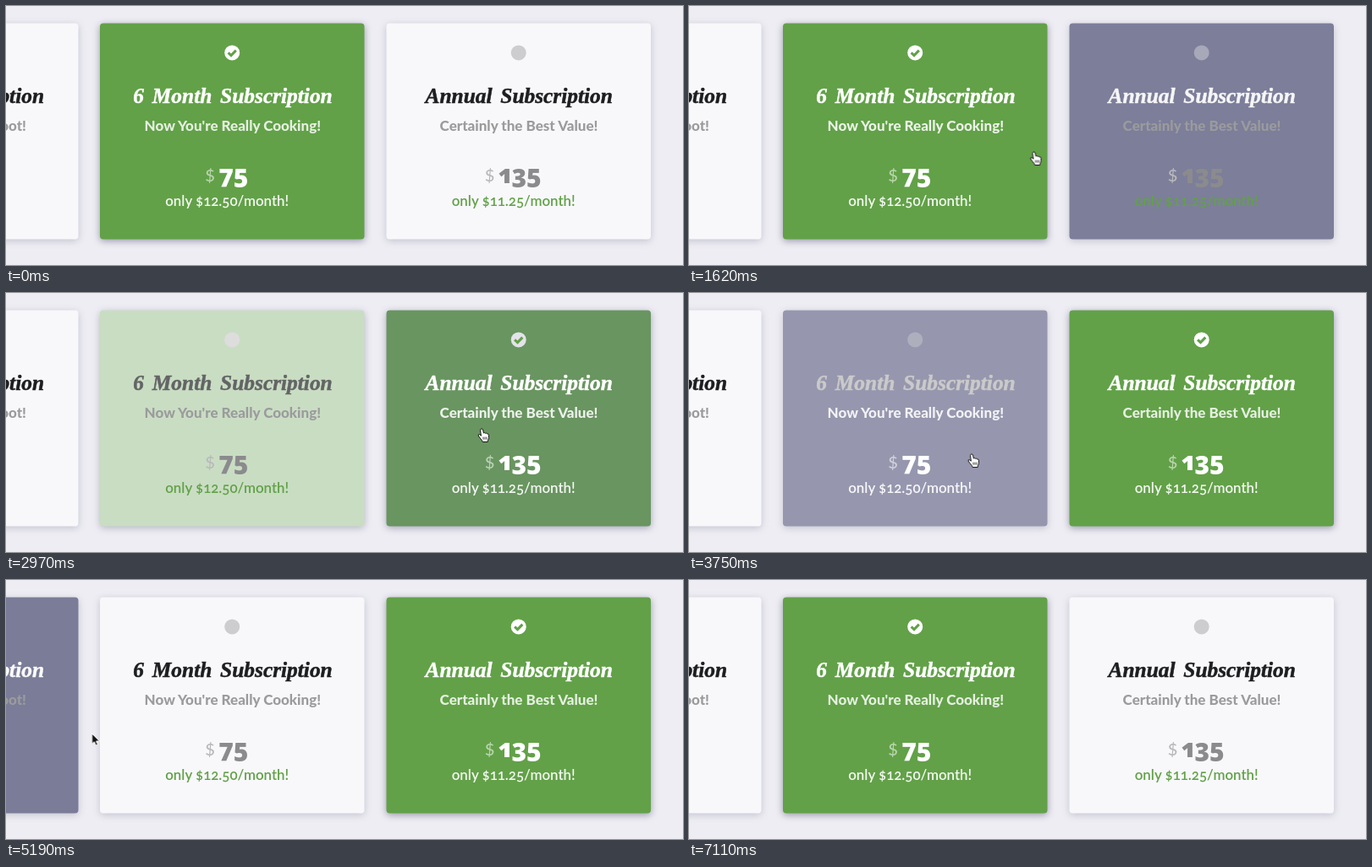
These frames come from a looping animation (800 by 307 pixels, 9110 ms). An HTML page:

```html
<!DOCTYPE html>
<html lang="en">
<head>
<meta charset="utf-8">
<title>Subscription cards</title>
<style>
/* --hover and --sel fade; --over and --pick switch at once */
@property --hover { syntax: "<number>"; inherits: true; initial-value: 0; }
@property --sel { syntax: "<number>"; inherits: true; initial-value: 0; }
@property --over { syntax: "<number>"; inherits: true; initial-value: 0; }
@property --pick { syntax: "<number>"; inherits: true; initial-value: 0; }

html, body { margin: 0; width: 100%; height: 100%; overflow: hidden; background: #eeedf3; }
svg { display: block; }

.card, .cursor {
  animation-duration: 9.11s;
  animation-iteration-count: infinite;
}
.card {
  --green: #62a148;
  --lit: calc(100% * max(var(--hover), var(--sel)));
  --on: calc(100% * max(var(--over), var(--pick)));
  animation-timing-function: ease, step-end, ease, step-end;
}
.left { animation-name: left-hover, left-over; }
.mid { animation-name: mid-hover, mid-over, mid-sel, mid-pick; }
.right { animation-name: right-hover, right-over, right-sel, right-pick; }

.panel {
  fill: color-mix(in srgb, var(--green) calc(100% * var(--sel)),
    color-mix(in srgb, #777996 calc(100% * var(--hover)), #f8f8fb));
  filter: drop-shadow(0 2.5px 4.5px rgb(45 48 85 / calc(.22 + .24 * var(--sel))));
}
.dot {
  fill: color-mix(in srgb, #fff calc(100% * var(--sel)),
    color-mix(in srgb, #a5a6b7 calc(100% * var(--hover)), #cdcdcf));
}
.check {
  fill: none;
  stroke: var(--green);
  stroke-width: 3;
  opacity: var(--pick);
}
text { font-family: Lato, "Open Sans", sans-serif; }
.title {
  font: italic bold 25.4px "Liberation Serif", serif;
  word-spacing: 3.4px;
  text-anchor: middle;
  color: color-mix(in srgb, #fff var(--lit), #1d1e20);
  fill: currentColor;
  stroke: currentColor;
  stroke-width: .5px;
}
.sub {
  font-size: 17px;
  font-weight: 800;
  text-anchor: middle;
  fill: color-mix(in srgb, rgb(255 255 255 / calc(.84 + .04 * var(--over))) var(--on), #9b9b9d);
}
.unit {
  font-size: 20px;
  font-weight: 500;
  fill: color-mix(in srgb, rgb(255 255 255 / .55) var(--on), #b9b9bb);
}
.price {
  font: 800 30px "Open Sans", Lato, sans-serif;
  font-variant-numeric: oldstyle-nums;
  fill: color-mix(in srgb, #fff var(--on), #8b8b8e);
}
.rate {
  font-size: 16.9px;
  font-weight: 600;
  text-anchor: middle;
  font-variant-numeric: oldstyle-nums;
  fill: color-mix(in srgb, rgb(255 255 255 / .92) var(--on), var(--green));
}
.left text { text-anchor: end; }

.cursor {
  animation-name: travel, cursor-over;
  animation-timing-function: linear, step-end;
}
.hand { opacity: var(--over); fill: #fff; stroke: #111; stroke-linejoin: round; }
.arrow { opacity: calc(1 - var(--over)); fill: #111; stroke: #fff; }

@keyframes left-hover {
  0%, 49.62%, 60.15%, 100% { --hover: 0; }
  52.91%, 56.86% { --hover: 1; }
}
@keyframes left-over {
  0%, 56.86%, 100% { --over: 0; }
  49.62% { --over: 1; }
}
@keyframes mid-hover {
  0%, 17.7%, 26.45%, 39.65%, 52.47%, 57.19%, 78.48%, 100% { --hover: 0; }
  20.99%, 23.16%, 42.94%, 49.18%, 60.48%, 75.19% { --hover: 1; }
}
@keyframes mid-over {
  0%, 23.16%, 49.18%, 75.19%, 100% { --over: 0; }
  17.7%, 39.65%, 57.19% { --over: 1; }
}
@keyframes mid-sel {
  0%, 31.28%, 70.03%, 100% { --sel: 1; }
  34.57%, 66.74% { --sel: 0; }
}
@keyframes mid-pick {
  0%, 66.74%, 100% { --pick: 1; }
  31.28% { --pick: 0; }
}
@keyframes right-hover {
  0%, 4.28%, 20.9%, 23.44%, 42.53%, 100% { --hover: 0; }
  7.57%, 17.61%, 26.73%, 39.24% { --hover: 1; }
}
@keyframes right-over {
  0%, 17.61%, 39.24%, 100% { --over: 0; }
  4.28%, 23.44% { --over: 1; }
}
@keyframes right-sel {
  0%, 31.28%, 70.03%, 100% { --sel: 0; }
  34.57%, 66.74% { --sel: 1; }
}
@keyframes right-pick {
  0%, 66.74%, 100% { --pick: 0; }
  31.28% { --pick: 1; }
}
@keyframes cursor-over {
  0%, 17.61%, 23.16%, 39.24%, 49.18%, 56.86%, 75.19%, 100% { --over: 0; }
  4.28%, 17.7%, 23.44%, 39.65%, 49.62%, 57.19% { --over: 1; }
}
@keyframes travel {
  0%, 2.74% { transform: translate(610px, 312px); }
  4.28% { transform: translate(604px, 277px); animation-timing-function: ease-out; }
  7.14% { transform: translate(590px, 190px); }
  10.21% { transform: translate(575px, 178px); }
  15.92% { transform: translate(562px, 172px); animation-timing-function: ease-in; }
  17.61% { transform: translate(449px, 172px); }
  17.7% { transform: translate(423px, 173px); }
  17.783% { transform: translate(408px, 173px); animation-timing-function: ease-out; }
  20.31% { transform: translate(330px, 180px); }
  21.95% { transform: translate(332px, 178px); animation-timing-function: ease-in; }
  23.16% { transform: translate(423px, 172px); }
  23.44% { transform: translate(449px, 170px); animation-timing-function: ease-out; }
  25.25% { transform: translate(540px, 163px); animation-timing-function: ease-out; }
  28.32%, 37.32% { transform: translate(562px, 161px); animation-timing-function: ease-in; }
  39.24% { transform: translate(449px, 180px); }
  39.65% { transform: translate(423px, 183px); }
  41.164% { transform: translate(334px, 191px); animation-timing-function: ease-out; }
  44.46%, 47.09% { transform: translate(300px, 196px); animation-timing-function: ease-in; }
  49.18% { transform: translate(111px, 192px); }
  49.62% { transform: translate(86px, 191px); animation-timing-function: ease-out; }
  52.14% { transform: translate(40px, 190px); }
  54.88% { transform: translate(38px, 188px); animation-timing-function: ease-in; }
  56.86% { transform: translate(86px, 183px); }
  56.97% { transform: translate(101px, 182px); }
  57.19% { transform: translate(111px, 181px); animation-timing-function: ease-out; }
  61.47% { transform: translate(290px, 172px); animation-timing-function: ease-out; }
  64.54%, 69.15% { transform: translate(309px, 171px); animation-timing-function: ease-in; }
  75.19% { transform: translate(330px, 277px); }
  76.84%, 100% { transform: translate(335px, 312px); }
}
</style>
</head>
<body>
<svg width="800" height="307" viewBox="0 0 800 307">
  <g class="card left">
    <rect class="panel" x="-227" y="20.6" width="312.5" height="256" rx="4"/>
    <text class="title" x="45" y="115">3 Month Subscription</text>
    <text class="sub" x="24" y="148">Start on the Right Foot!</text>
  </g>

  <g class="card mid" transform="translate(267.2 0)">
    <rect class="panel" x="-156.2" y="20.6" width="312.5" height="256" rx="4"/>
    <circle class="dot" cy="55.4" r="9"/>
    <path class="check" d="M-4.6 55.3l3.4 3.3 5.8-6"/>
    <text class="title" x=".8" y="115">6 Month Subscription</text>
    <text class="sub" x=".6" y="148">Now You're Really Cooking!</text>
    <text class="unit" x="-32" y="208">$</text>
    <text class="price" x="-16" y="209.5">75</text>
    <text class="rate" x="-6" y="237">only $12.50/month!</text>
  </g>

  <g class="card right" transform="translate(605.7 0)">
    <rect class="panel" x="-156.2" y="20.6" width="312.5" height="256" rx="4"/>
    <circle class="dot" cy="55.4" r="9"/>
    <path class="check" d="M-4.6 55.3l3.4 3.3 5.8-6"/>
    <text class="title" x=".5" y="115">Annual Subscription</text>
    <text class="sub" x=".3" y="148">Certainly the Best Value!</text>
    <text class="unit" x="-40" y="208">$</text>
    <text class="price" x="-24" y="209.5">135</text>
    <text class="rate" x="-6" y="237">only $11.25/month!</text>
  </g>

  <g class="cursor">
    <path class="arrow" d="M0 0v12.4l2.8-2.6 1.9 4.4 2.2-.9-1.9-4.3h3.9z"/>
    <g class="hand">
      <path d="M-1.5 1.5C-1.7-.3 1.2-.6 1.6 1L2.4 5q1.3-.9 2.2.3 1.4-.7 2.1.6 1.7-.4 1.8 1.4v3q0 2-1 3l-.3 2.2h-6l-.8-2q-2.5-2.6-4.2-5.4-.6-1.8 1.6-1.4l1.6 1.6z"/>
      <path d="M2 9.6v3M4 9.6v3M6 9.6v3" stroke-width=".8"/>
    </g>
  </g>
</svg>
</body>
</html>
```
